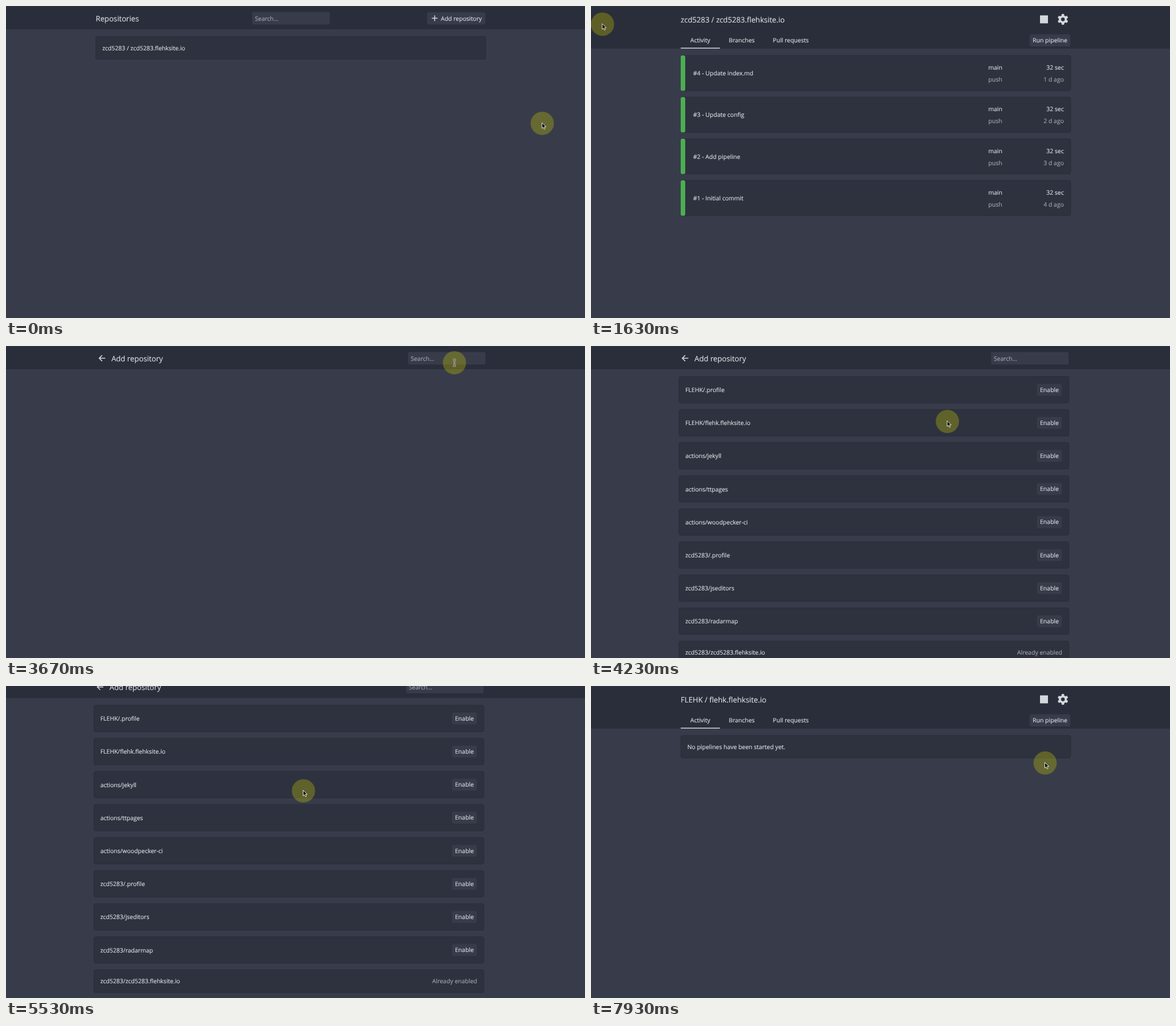
Write an HTML page that moves like this. It is 1020 px wide and 549 px high and loops after 8 s.

```html
<!DOCTYPE html>
<html lang="en">
<head>
<meta charset="utf-8">
<title>Repositories</title>
<style>
html, body { margin: 0; width: 100%; height: 100%; overflow: hidden; background: #383c4a; }
svg { display: block; width: 1020px; height: 549px; }
text { font: 10.5px "Open Sans", "Noto Sans", sans-serif; fill: #d8dbe0; stroke: #d8dbe0; stroke-width: .18; text-rendering: geometricPrecision; white-space: pre; }
.title { font-size: 13.2px; }
.dim { fill: #9fa2ab; stroke: #9fa2ab; }
.head { fill: #2a2e3a; }
.card { fill: #2e323e; stroke: #2a2e3a; }
.card.hover { fill: #2a2e3a; filter: drop-shadow(0 1px 2px rgba(0, 0, 0, .25)); }
.field { fill: #383c4a; }
.btn { fill: #383c4a; stroke: #303440; }
.icon { fill: none; stroke: #d8dbe0; stroke-width: 1.5; }
.solid { fill: #d4d7dd; }
</style>
</head>
<body>
<svg id="stage" viewBox="0 0 1020 549"></svg>
<script>
const LOOP = 8000;
const USER = 'zcd5283', ORG = 'FLEHK', SITE = 'flehksite.io';

const text = (x, y, s, cls = '', anchor = 'start') =>
  `<text x="${x}" y="${y}" class="${cls}" text-anchor="${anchor}">${s}</text>`;
const rect = (x, y, w, h, cls, r = 0, id = '') =>
  `<rect ${id && `id="${id}"`} x="${x}" y="${y}" width="${w}" height="${h}" rx="${r}" class="${cls}"/>`;
const group = (id, body) => `<g id="${id}">${body}</g>`;
const card = (x, y, h, id) => rect(x, y, 687, h, 'card', 3.5, id);
const button = (x, y, w, label) =>
  rect(x, y, w, 21.5, 'btn', 3) + text(x + w / 2, y + 14.3, label, '', 'middle');
const header = h => rect(0, 0, 1020, h, 'head') + '<path d="M0 .6H1020" stroke="#303440" stroke-width="1.2"/>';
const search = x => rect(x, 10.8, 136.5, 21.7, 'field', 3) + text(x + 4.7, 25.5, 'Search...', 'dim');

function reposPage() {
  return header(41) + text(158, 27, 'Repositories', 'title') + search(433.8) +
    rect(741.7, 10.9, 102.8, 21.5, 'btn', 3) +
    '<path class="icon" d="M750.2 21.5h10M755.2 16.5v10"/>' +
    text(766, 25.5, 'Add repository') +
    card(158.2, 53.5, 40.3, 'repoCard') +
    text(169.7, 77.7, `${USER} / ${USER}.${SITE}`);
}

function addHeader() {
  return '<path class="icon" d="M174.8 21.5H164.5M169.3 16.4L164.2 21.5L169.3 26.6"/>' +
    text(185.7, 27, 'Add repository', 'title') + search(708.2);
}

function repoList() {
  const names = [`${ORG}/.profile`, `${ORG}/${ORG.toLowerCase()}.${SITE}`, 'actions/jekyll',
    'actions/ttpages', 'actions/woodpecker-ci', `${USER}/.profile`, `${USER}/jseditors`,
    `${USER}/radarmap`, `${USER}/${USER}.${SITE}`];
  return names.map((name, i) => {
    const y = 53.5 + 58.2 * i, last = i === names.length - 1;
    return card(154.9, y, last ? 40.3 : 46.8) + text(166.2, y + (last ? 24 : 27.5), name) +
      (last ? text(830, y + 24, 'Already enabled', 'dim', 'end') : button(785.5, y + 12.7, 44.2, 'Enable'));
  }).join('');
}

function repoHeader(name) {
  const teeth = [0, 60, 120].map(a =>
    `<path d="M-1.9-9.4H1.9L2.8-5V5L1.9 9.4H-1.9L-2.8 5V-5Z" transform="rotate(${a})"/>`).join('');
  return header(75) + text(158, 29, name, 'title') +
    rect(791, 16.5, 14, 14, 'solid') +
    `<g transform="translate(831.3 23.5)" class="solid">${teeth}<circle r="7"/><circle r="3.2" class="head"/></g>` +
    text(192.5, 64, 'Activity', '', 'middle') + text(265.6, 64, 'Branches', '', 'middle') +
    text(352, 64, 'Pull requests', '', 'middle') +
    rect(158, 73.4, 69, 1.5, 'solid') + button(772.7, 49.8, 71.8, 'Run pipeline');
}

function pipelines() {
  return ['Update index.md', 'Update config', 'Add pipeline', 'Initial commit'].map((msg, i) => {
    const y = 87 + 73.25 * i;
    return card(158.2, y, 62.2) + `<rect x="158" y="${y}" width="8" height="62.2" rx="3" fill="#4caf50"/>` +
      text(180, y + 35, `#${4 - i} - ${msg}`) +
      text(700, y + 25, 'main') + text(700, y + 46, 'push', 'dim') +
      text(833, y + 25, '32 sec', '', 'end') + text(833, y + 46, `${i + 1} d ago`, 'dim', 'end');
  }).join('');
}

const pointers = {
  arrow: '<path d="M-.5-.5V9.3L1.8 7.2L3.4 10.9L5.1 10.1L3.5 6.6H6.6Z" fill="#000" stroke="#fff" stroke-width=".9"/>',
  hand: '<path d="M-.9 0Q0-1.2 .8 0V3.2L4.3 4.2Q5.3 4.6 5.1 6L4.4 9.3H-.1L-2.8 5.9Q-2.6 4.6-.9 5.8Z" fill="#fff" stroke="#111" stroke-width=".8"/>',
  beam: ['#fff" stroke-width="2.4', '#111" stroke-width="1'].map(s =>
    `<path d="M-2.5-5H2.5M0-5V6M-2.5 6H2.5" fill="none" stroke="${s}"/>`).join('')
};

const stage = document.getElementById('stage');
stage.innerHTML =
  group('repos', reposPage()) +
  group('first', repoHeader(`${USER} / ${USER}.${SITE}`) + group('builds', pipelines())) +
  group('add', header(41) + group('addTop', addHeader()) + group('list', repoList())) +
  group('second', repoHeader(`${ORG} / ${ORG.toLowerCase()}.${SITE}`) +
    group('empty', card(158.2, 87, 39.8) + text(169.7, 111, 'No pipelines have been started yet.'))) +
  group('mouse', '<circle cy=".4" r="20.5" fill="#c8c800" fill-opacity=".32"/>' +
    '<circle id="press" r="6.5" fill="#e01818" fill-opacity=".85"/>' +
    Object.keys(pointers).map(k => group(k, pointers[k])).join(''));

const el = id => document.getElementById(id);
const show = (id, on) => { el(id).style.display = on ? '' : 'none'; };

// start time, page
const pages = [[0, 'repos'], [900, 'first'], [2600, 'repos'], [3580, 'add'], [7450, 'second']];
// time, x, y of the pointer
const path = [[0, 944.7, 206], [30, 944.7, 206], [690, 236, 73], [1270, 236, 73], [1770, -30, 22],
  [2869, -30, 22], [2870, 168, -24], [3430, 790, 29], [3700, 790, 29], [4400, 600, 150],
  [4530, 600, 150], [4900, 524, 184], [5560, 524, 184], [6200, 787, 131], [6300, 787, 131],
  [6420, 765, 139], [6540, 783, 155], [6660, 803, 139], [6770, 790, 120], [6900, 800, 135],
  [LOOP, 800, 135]];
const presses = [[690, 850], [3450, 3570], [7270, 7400]];
const scrolls = [[0, 0], [4980, 0], [5240, 22], [5480, 22], [5740, 0], [LOOP, 0]];

function sample(keys, t) {
  const i = Math.max(1, keys.findIndex(k => k[0] > t));
  const a = keys[i - 1], b = keys[i];
  const p = (t - a[0]) / (b[0] - a[0]), e = p * p * (3 - 2 * p);
  return a.slice(1).map((v, j) => v + (b[j + 1] - v) * e);
}

const inside = (x, y, l, t, r, b) => x > l && x < r && y > t && y < b;

function pointerAt(page, listed, x, y) {
  if (page === 'repos') {
    if (inside(x, y, 158, 53, 845, 94) || inside(x, y, 742, 11, 845, 33)) return 'hand';
    if (inside(x, y, 434, 11, 570, 33)) return 'beam';
  }
  if (page === 'add') {
    if (inside(x, y, 705, 11, 845, 33)) return 'beam';
    if (listed && inside(x, y, 785, 124, 830, 147)) return 'hand';
  }
  return 'arrow';
}

function draw(t) {
  const page = pages.filter(p => p[0] <= t).pop()[1];
  for (const id of ['repos', 'first', 'add', 'second']) show(id, id === page);
  show('builds', t >= 1280);
  show('empty', t >= 7750);

  const listed = t >= 3960;
  show('list', listed);
  el('addTop').setAttribute('transform', `translate(${listed ? -3.4 : 0})`);
  el('add').setAttribute('transform', `translate(0 ${-sample(scrolls, t)[0]})`);

  const [x, y] = sample(path, t);
  const kind = pointerAt(page, listed, x, y);
  for (const k in pointers) show(k, k === kind);
  show('press', presses.some(([a, b]) => t >= a && t < b));
  el('mouse').setAttribute('transform', `translate(${x} ${y})`);
  el('repoCard').classList.toggle('hover', inside(x, y, 158, 53, 845, 94));
}

const start = performance.now();
function tick() {
  draw((performance.now() - start) % LOOP);
  requestAnimationFrame(tick);
}
tick();
</script>
</body>
</html>
```
